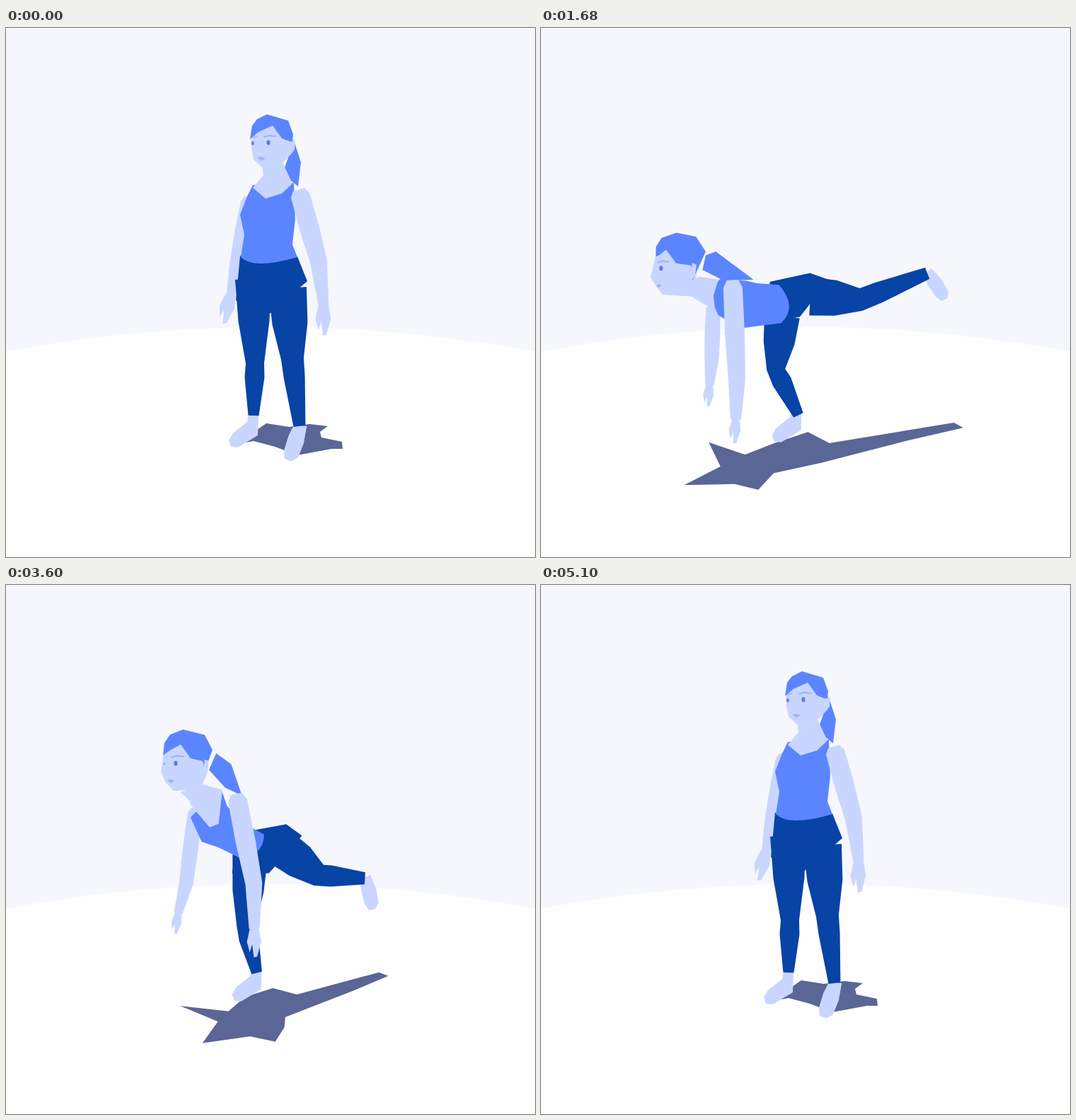
Animation, 748 px wide and 748 px high, one loop 5.13 s. Source, as an HTML page:

```html
<!DOCTYPE html>
<html lang="en">
<head>
<meta charset="utf-8">
<title>Single-leg reach</title>
<style>
  html, body { margin: 0; width: 100%; height: 100%; overflow: hidden; background: #f6f7fd; }
  svg { display: block; width: 100%; height: 100%; }
</style>
</head>
<body>
<svg id="stage" viewBox="0 0 748 748">
  <rect width="748" height="748" fill="#f6f7fd"/>
  <path d="M0 457.5Q374 388 748 457.5V748H0Z" fill="#fefefe"/>
</svg>
<script>
const LOOP = 5130, STEP = 30;
const SKIN = '#c8d6ff', BLUE = '#5b85ff', NAVY = '#0843a6', SHADE = '#5a6695';
const EYE = '#5e7ce6', SOFT = '#a3b3ee';
const [STAND, LIFT, BEND, HOLD, DEEP, TURN] = [0, 1, 2, 3, 4, 5];

// time, pose, next pose, share of the way in x and in y
const keys = [
  [0, STAND], [540, STAND, LIFT, .32, .12], [720, LIFT], [1080, LIFT, BEND, .85, .85],
  [1230, BEND], [1650, BEND, HOLD, .75, .75], [2190, HOLD], [2700, HOLD, DEEP, .08, .08],
  [3150, DEEP], [3240, DEEP], [3440, BEND], [3795, LIFT, TURN, .1, .45],
  [4050, TURN], [4350, TURN, STAND, .85, .85], [4800, STAND], [LOOP, STAND],
];
const times = keys.map(k => k[0]);
const numbers = text => text.split(' ').map(Number);
const mix = (a, b, f) => a + (b - a) * f;
const pairs = list => list.flatMap((v, i) => i % 2 ? [[list[i - 1], v]] : []);

// Monotone slopes keep values from overshooting their keys.
function slopesOf(values) {
  const secant = i => (values[i + 1] - values[i]) / (times[i + 1] - times[i]);
  return values.map((_, i) => {
    if (i === 0 || i === values.length - 1) return 0;
    const a = secant(i - 1), b = secant(i);
    return a * b > 0 ? 2 * a * b / (a + b) : 0;
  });
}

// One row per pose; a lone pair moves HOLD (for DEEP) or STAND (for TURN).
function track(...rows) {
  const poses = rows.map(numbers);
  for (const [pose, base] of [[DEEP, HOLD], [TURN, STAND]]) {
    const shift = poses[pose];
    if (shift.length === 2) poses[pose] = poses[base].map((v, i) => v + shift[i % 2]);
  }
  const curves = poses[0].map((_, c) => {
    const v = keys.map(([, from, to = from, fx = 0, fy = 0]) =>
      mix(poses[from][c], poses[to][c], c % 2 ? fy : fx));
    return { v, m: slopesOf(v) };
  });
  return t => {
    const i = times.findIndex((time, n) => t >= time && t < times[n + 1]);
    const span = times[i + 1] - times[i], u = (t - times[i]) / span;
    return curves.map(({ v, m }) => mix(v[i], v[i + 1], u * u * (3 - 2 * u))
      + span * u * (1 - u) * (m[i] * (1 - u) - m[i + 1] * u));
  };
}

const shadow = track(
  '345 575 368 559 400 564 429 560 455 563 444 571 446 579 475 585 476 595 461 595 412 604 380 592 350 584 330 588',
  '345 582 387 569 417 577 500 545 507 554 463 575 414 609 437 629 415 642 391 626 331 634 328 600 276 591 325 590',
  '330 584 372 572 407 584 553 545 570 549 510 572 385 617 352 631 345 656 303 651 231 661 273 630 231 598 300 611',
  '330 588 379 571 408 588 593 562 605 570 520 587 400 614 322 629 296 652 265 643 194 642 248 617 239 582 285 601',
  '-6 2', '-7 6');

const tail = track(
  '408 162 417 190 413 224 391 206 403 172',
  '342 183 364 208 364 247 340 236 328 208',
  '256 300 275 303 309 348 281 342 250 322',
  '226 328 239 320 298 358 252 362 222 348',
  '-8 6',
  '391 158 413 183 410 225 390 212 383 182');

// shoulder, elbow, wrist, fingertips
const farArm = track(
  '342 246 326 335 318 376 308 418', '291 262 280 370 267 424 259 455',
  '248 385 239 470 232 505 230 533', '242 400 242 470 240 505 238 536', '-8 8', '4 0');
const nearArm = track(
  '416 236 442 330 449 391 450 435', '360 256 394 350 400 434 403 470',
  '296 356 307 490 304 543 303 582', '264 370 268 500 267 557 265 589', '-4 8', '-15 -1');

// hip, knee, ankle and, for the raised leg, toes
const standingLeg = track(
  '349 355 352 474 350 548', '346 370 347 481 353 548',
  '344 400 333 486 357 549', '340 410 332 482 366 547', '-4 1', '4 -1');
const raisedLeg = track(
  '398 368 405 468 415 563 400 612', '392 364 432 436 485 469 489 519',
  '384 378 448 387 527 356 546 395', '380 380 454 383 552 344 580 380',
  '-5 3', '394 368 401 466 427 558 400 604');
const standingFoot = track('0 0', '3 -3', '7 -5', '13 -8', '13 -8', '7 -5');

const seat = track(
  '331 322 412 323 426 358 373 404 325 385',
  '326 364 402 336 424 354 377 393 320 410',
  '330 354 388 345 411 356 366 407 319 412',
  '322 360 378 347 406 356 366 409 312 418',
  '-6 4',
  '329 325 403 322 421 352 370 428 324 395');

const torso = track(
  '349 222 341 238 331 264 337 292 332 324 361 333 412 324 405 306 409 270 407 219',
  '291 250 288 265 290 316 311 335 326 366 349 372 381 355 375 342 350 284 346 243',
  '266 360 241 377 263 406 290 414 344 415 364 388 349 361 308 348 290 346 270 342',
  '240 364 235 374 247 406 278 428 338 418 347 394 333 364 305 365 290 361 248 359',
  '-5 3',
  '340 233 331 248 321 267 329 292 329 327 350 334 403 322 393 306 396 268 390 218');

const neck = track(
  '362 192 364 208 349 226 367 241 390 234 405 220 391 190',
  '290 225 296 244 290 252 311 289 331 274 344 246 326 230',
  '210 360 232 371 242 377 265 394 270 388 271 340 240 340',
  '190 372 222 391 243 404 240 394 236 376 245 360 218 355',
  '-8 9', '-15 2');

// crown x and y, turn towards profile, scale
const head = track('369 122 0 1', '296 145 .3 1.09', '210 271 .7 1.08',
  '186 295 1 1', '174.5 308 1 1', '352 122 .3 1');

// Head features, measured from the crown: three-quarter view, then profile.
const feature = (front, side) => t => {
  const a = numbers(front), b = numbers(side), [x, y, turn, size] = head(t);
  return pairs(a.map((v, i) => (i % 2 ? y : x) + size * mix(v, b[i], turn)));
};
const face = feature('-23 30 -22 50 -19 64 -6 76 22 69 36 54 40 38 9 10',
  '-29 31 -37 63 -28 76 -20 87 24 90 27 62 27 43 -8 20');
const hair = feature('-24 35 -21 16 -14 7 0 0 30 9 37 28 36 39 31 38 21 34 8 16 -12 25',
  '-29 33 -29 20 -21 7 0 0 27 5 41 26 21 69 20 46 -2 43 -16 24 -24 31');
const ear = feature('35 38 40 38 39 50 32 58', '21 42 27 45 25 60 19 68');
const nearEye = feature('2 39 2 41', '-23 49 -23 51');
const farEye = feature('-20 40 -20 42', '-30 49 -30 51');
const nearBrow = feature('-4 32 3 30 12 31', '-27 42 -22 40 -13 41');
const farBrow = feature('-20 33 -14 31', '-28 41 -28 41');
const mouth = feature('-14 61 -8 60 -2 62 -8 66', '-29 74 -25 72 -22 74 -26 77');

// Outlines along and across a bone of the given length.
const HAND = { length: 44, points: pairs(numbers('0 7 20 10 43 3 44 -2 24 -4 36 -8 20 -12 0 -7')) };
const FOOT = { length: 52, points: pairs(numbers('0 -8 18 -11 40 -11 51 -7 52 3 44 11 22 13 -3 10')) };
const PLANTED = pairs(numbers('343 546 341 557 321 573 315 583 318 592 328 593 356 576 357 546'));

function place(shape, [x, y], [tipX, tipY]) {
  const dx = (tipX - x) / shape.length, dy = (tipY - y) / shape.length;
  return shape.points.map(([along, across]) =>
    [x + dx * along + dy * across, y + dy * along - dx * across]);
}

// Outline of a chain of [centre, half width] stations, with an optional end.
function ribbon(stations, end = []) {
  const sides = [[], []];
  stations.forEach(([[x, y], half], i) => {
    const [a] = stations[Math.max(0, i - 1)], [b] = stations[Math.min(stations.length - 1, i + 1)];
    const dx = b[0] - a[0], dy = b[1] - a[1], k = half / Math.hypot(dx, dy);
    sides[0].push([x + dy * k, y - dx * k]);
    sides[1].unshift([x - dy * k, y + dx * k]);
  });
  return [...sides[0], ...end, ...sides[1]];
}
const between = (a, b, f) => [mix(a[0], b[0], f), mix(a[1], b[1], f)];

const arm = (joints, [top, middle, elbow, wrist]) => t => {
  const [s, e, w, tip] = pairs(joints(t));
  return ribbon([[between(s, e, -.08), top * .6], [s, top], [between(s, e, .5), middle], [e, elbow], [w, wrist]],
    place(HAND, w, tip));
};
const leg = (joints, [hip, thigh, knee, calf, ankle]) => t => {
  const [h, k, a] = pairs(joints(t));
  return ribbon([[h, hip], [between(h, k, .5), thigh], [k, knee], [between(k, a, .27), calf], [a, ankle]]);
};
const outline = values => t => pairs(values(t));

const polygon = points => 'M' + points.map(p => p.map(v => v.toFixed(2))).join('L');
function torsoPath(t) {
  const p = pairs(torso(t)), [left, mid, right] = p.slice(4, 7);
  const bend = mid.map((v, i) => 2 * v - (left[i] + right[i]) / 2);
  return polygon(p.slice(0, 5)) + 'Q' + bend + ' ' + right + polygon(p.slice(7)).replace('M', 'L') + 'Z';
}

const stage = document.getElementById('stage');
const updates = [];
function addPath(attributes, path, refresh) {
  const node = document.createElementNS('http://www.w3.org/2000/svg', 'path');
  for (const name in attributes) node.setAttribute(name, attributes[name]);
  stage.append(node);
  updates.push(t => {
    node.setAttribute('d', path(t));
    if (refresh) refresh(node, t);
  });
}
const fill = (color, points) => addPath({ fill: color }, t => polygon(points(t)) + 'Z');
const line = (color, width, points, refresh) => addPath({
  fill: 'none', stroke: color, 'stroke-width': width, 'stroke-linecap': 'round', 'stroke-linejoin': 'round',
}, t => polygon(points(t)), refresh);
// Features on the far side vanish as the head turns.
const fade = width => (node, t) =>
  node.setAttribute('stroke-width', width * Math.max(0, 1 - 1.5 * head(t)[2]));

fill(SHADE, outline(shadow));
fill(BLUE, outline(tail));
fill(SKIN, arm(farArm, [10, 11, 10, 6]));
fill(SKIN, t => {
  const [dx, dy] = standingFoot(t);
  return PLANTED.map(([x, y]) => [x + dx, y + dy]);
});
fill(SKIN, t => {
  const [, , ankle, toes] = pairs(raisedLeg(t));
  return place(FOOT, ankle, toes);
});
fill(NAVY, leg(raisedLeg, [27, 25, 16, 15, 8.5]));
fill(NAVY, leg(standingLeg, [25, 22, 13, 14, 7.5]));
fill(NAVY, outline(seat));
addPath({ fill: BLUE }, torsoPath);
fill(SKIN, outline(neck));
fill(SKIN, arm(nearArm, [13.5, 14, 12, 7.5]));
fill(SKIN, face);
fill(BLUE, hair);
fill(SKIN, ear);
line(EYE, 5, nearEye);
line(EYE, 3.5, farEye, fade(3.5));
line(SOFT, 2.2, nearBrow);
line(SOFT, 1.6, farBrow, fade(1.6));
fill(SOFT, mouth);

const start = performance.now();
function frame() {
  const now = Math.max(0, performance.now() - start) % LOOP;
  const t = Math.floor(now / STEP) * STEP;
  for (const update of updates) update(t);
  requestAnimationFrame(frame);
}
frame();
</script>
</body>
</html>
```
